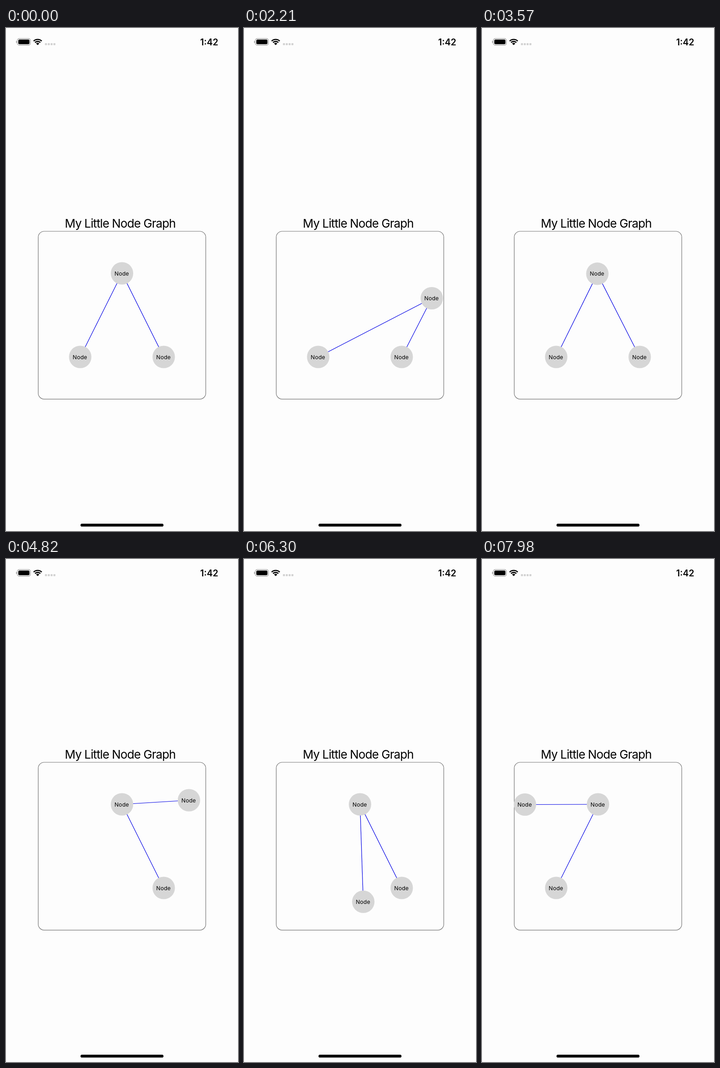
Recreate the animation shown at these times as an HTML page with a canvas. Size 509 px wide and 1101 px high, loop 8000 ms.

```html
<!DOCTYPE html>
<html lang="en">
<head>
<meta charset="utf-8">
<title>Node graph</title>
<style>
html, body { margin: 0; width: 100%; height: 100%; overflow: hidden; background: #fdfdfd; }
canvas { display: block; width: 509px; height: 1101px; }
</style>
</head>
<body>
<canvas id="stage"></canvas>
<script>
const LOOP = 8000, WIDTH = 509, HEIGHT = 1101, RADIUS = 24.6;
const FONT = 'Inter, Roboto, sans-serif';
const canvas = document.getElementById('stage');
const ctx = canvas.getContext('2d');
const ratio = window.devicePixelRatio || 1;
canvas.width = WIDTH * ratio;
canvas.height = HEIGHT * ratio;

// Each drag is a list of [time, x, y]; the node springs home after release.
const nodes = [
  { home: [254.5, 537], release: 2990, drag: [
    [880, 254.5, 537], [1620, 404, 548], [1720, 404, 548], [1940, 412, 574],
    [2140, 412, 574], [2210, 412, 591.5], [2310, 412, 602], [2550, 412, 602],
    [2790, 366, 470]] },
  { home: [162.8, 720], release: 6640, drag: [
    [4090, 162.8, 720], [4820, 401.3, 528], [5300, 300, 640],
    [5620, 95.4, 757.5], [6000, 95.4, 757.5], [6340, 268, 750]] },
  { home: [346, 720], release: Infinity, drag: [
    [7480, 346, 720], [7980, 94.2, 537.5]] }
];

const smooth = u => u * u * (3 - 2 * u);

// Underdamped spring: stiffness 100, damping 10, mass 1.
function spring(seconds) {
  const w = Math.sqrt(75);
  return Math.exp(-5 * seconds) * (Math.cos(w * seconds) + 5 / w * Math.sin(w * seconds));
}

function dragged(keys, time) {
  if (time <= keys[0][0]) return keys[0].slice(1);
  for (let i = 1; i < keys.length; i++) {
    const [t0, x0, y0] = keys[i - 1], [t1, x1, y1] = keys[i];
    if (time < t1) {
      const u = smooth((time - t0) / (t1 - t0));
      return [x0 + (x1 - x0) * u, y0 + (y1 - y0) * u];
    }
  }
  return keys[keys.length - 1].slice(1);
}

function position({ home, release, drag }, time) {
  const point = dragged(drag, time);
  if (time < release) return point;
  const k = spring((time - release) / 1000);
  return home.map((h, i) => h + (point[i] - h) * k);
}

function text(value, x, y, font, spacing, align) {
  ctx.font = `${font} ${FONT}`;
  ctx.letterSpacing = spacing + 'px';
  ctx.textAlign = align;
  ctx.fillStyle = '#000';
  ctx.fillText(value, x, y);
}

function roundBox(x, y, w, h, r) {
  ctx.beginPath();
  ctx.roundRect(x, y, w, h, r);
}

function wifi() {
  const cx = 69.5, cy = 37.6, spread = 0.78;
  const arc = r => ctx.arc(cx, cy, r, -Math.PI / 2 - spread, -Math.PI / 2 + spread);
  ctx.lineWidth = 2.7;
  ctx.strokeStyle = ctx.fillStyle = '#000';
  for (const r of [8.3, 12.6]) {
    ctx.beginPath();
    arc(r);
    ctx.stroke();
  }
  ctx.beginPath();
  ctx.moveTo(cx, cy);
  arc(5);
  ctx.fill();
}

function statusBar() {
  ctx.lineWidth = 1.2;
  ctx.strokeStyle = '#999';
  roundBox(24.8, 23.2, 28.8, 14.4, 4);
  ctx.stroke();
  ctx.fillStyle = '#000';
  roundBox(27, 25.2, 24.5, 10.4, 2.4);
  ctx.fill();
  ctx.fillStyle = '#999';
  roundBox(22, 28.2, 1.5, 4.6, 1);
  ctx.fill();
  wifi();
  ctx.fillStyle = '#d0d0d0';
  for (let i = 0; i < 4; i++) {
    roundBox(85.5 + i * 6.2, 33.2, 4.3, 4.4, 0.8);
    ctx.fill();
  }
  text('1:42', 426, 37.6, '600 19.5px', 0, 'left');
}

function edge([x0, y0], [x1, y1]) {
  ctx.beginPath();
  ctx.moveTo(x0, y0);
  ctx.lineTo(x1, y1);
  ctx.strokeStyle = '#0000e4';
  ctx.lineWidth = 1.2;
  ctx.stroke();
}

function drawNode([x, y]) {
  ctx.beginPath();
  ctx.arc(x, y, RADIUS, 0, Math.PI * 2);
  ctx.fillStyle = '#d6d6d6';
  ctx.fill();
  text('Node', x - 16.5, y + 4.5, '400 12.2px', 0.2, 'left');
}

function draw(now) {
  const time = now % LOOP;
  ctx.setTransform(ratio, 0, 0, ratio, 0, 0);
  ctx.fillStyle = '#fdfdfd';
  ctx.fillRect(0, 0, WIDTH, HEIGHT);
  statusBar();
  text('My Little Node Graph', 129, 437, '400 26px', -0.9, 'left');

  roundBox(70.7, 445, 367.6, 367.3, 13);
  ctx.strokeStyle = '#777';
  ctx.lineWidth = 1.2;
  ctx.stroke();

  const points = nodes.map(node => position(node, time));
  edge(points[0], points[1]);
  edge(points[0], points[2]);
  points.forEach(drawNode);

  ctx.fillStyle = '#000';
  roundBox(163.5, 1085, 182, 6.3, 3.15);
  ctx.fill();
}

const start = performance.now();
function tick() {
  draw(performance.now() - start);
  requestAnimationFrame(tick);
}
tick();
</script>
</body>
</html>
```
